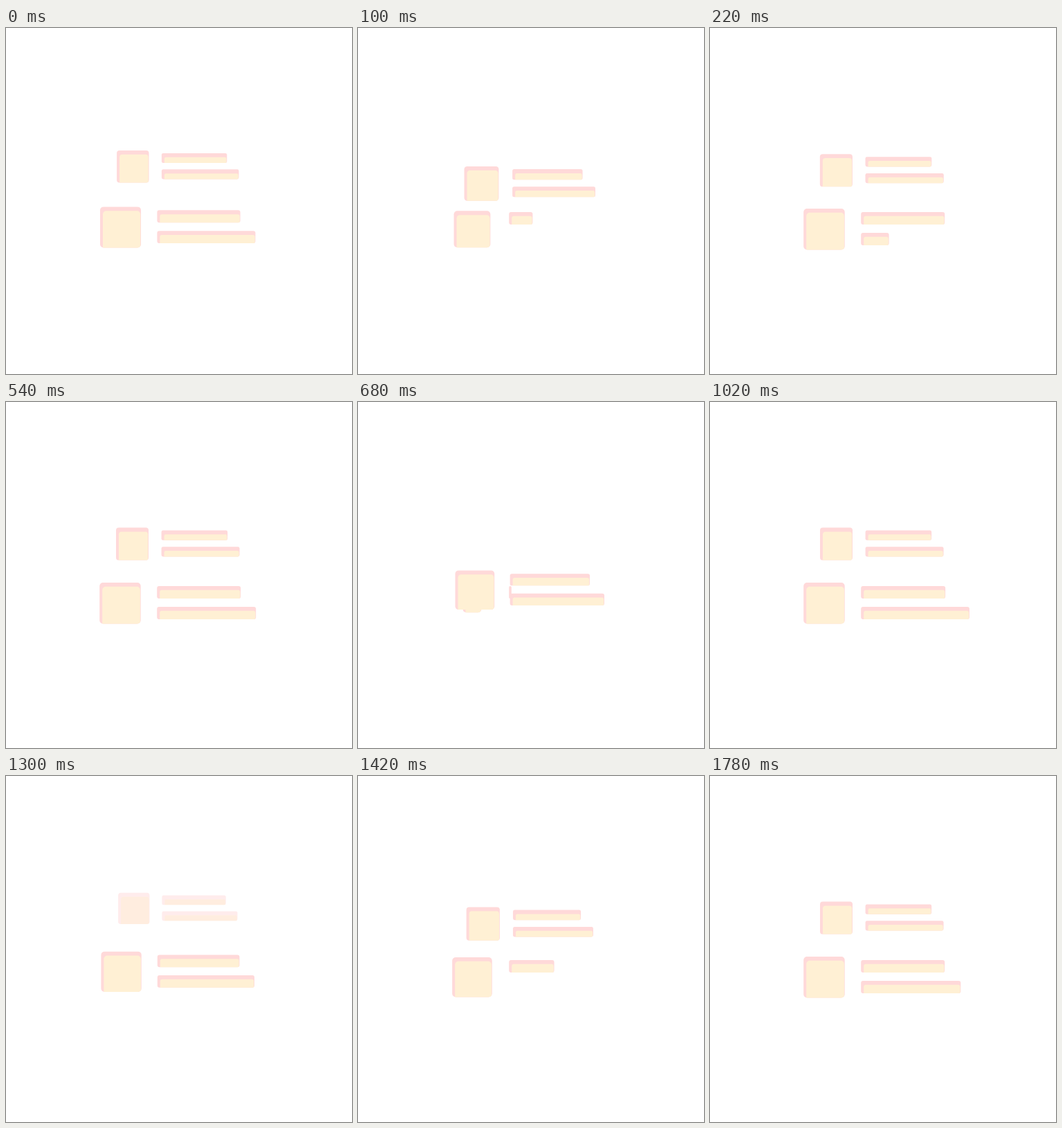
Recreate the animation shown at these times as an HTML page with a canvas. Size 500 by 500 pixels, loop 1.8 s.

```html
<!DOCTYPE html>
<html lang="en">
<head>
<meta charset="utf-8">
<title>List loop</title>
<style>
  html, body { margin: 0; width: 100%; height: 100%; overflow: hidden; background: #fff; }
  canvas { display: block; width: 500px; height: 500px; }
</style>
</head>
<body>
<canvas id="stage" width="500" height="500"></canvas>
<script>
const ctx = document.getElementById('stage').getContext('2d');
const PINK = '#ffd9d9', CREAM = '#fff0d4';
const LOOP = 1800, CYCLE = 640, STEP = 20, LEAD = 40;
const SQUARE = 59.5, BARS = [{ y: 5, w: 121 }, { y: 35, w: 143 }];

// Resting places of a row: front, back and gone
const FRONT = { x: 135.2, y: 261, s: 1 };
const BACK = { x: 159, y: 181.6, s: 0.79 };
const GONE = { x: 192, y: 42, s: 0.5 };

const clamp = v => Math.min(1, Math.max(0, v));
const lerp = (a, b, p) => a + (b - a) * p;
const between = (a, b, p) => ({ x: lerp(a.x, b.x, p), y: lerp(a.y, b.y, p), s: lerp(a.s, b.s, p) });
const sine = p => (1 - Math.cos(Math.PI * p)) / 2;

// cubic-bezier(.5, 0, .09, 1)
function glide(x) {
  if (x <= 0 || x >= 1) return clamp(x);
  let lo = 0, hi = 1;
  for (let i = 0; i < 24; i++) {
    const s = (lo + hi) / 2, r = 1 - s;
    if (1.5 * r * r * s + 0.27 * r * s * s + s * s * s < x) lo = s; else hi = s;
  }
  return lo * lo * (3 - 2 * lo);
}

// Bar growth: rises past full length, then settles
function stretch(t) {
  if (t < 257) return 1.1 * sine(clamp(t / 257));
  return 1 + 0.1 * Math.pow(1 - sine(clamp((t - 257) / 150)), 1.4);
}

function block(x, y, w, h, r) {
  if (w < 0.5 || h < 0.5) return;
  r = Math.min(r, w / 2, h / 2);
  ctx.save();
  ctx.beginPath();
  ctx.roundRect(x, y, w, h, r);
  ctx.fillStyle = PINK;
  ctx.fill();
  if (w > 5) {
    ctx.clip();
    ctx.beginPath();
    ctx.roundRect(x + 4, y + 5.8, w - 4.8, h, r);
    ctx.fillStyle = CREAM;
    ctx.fill();
  }
  ctx.restore();
}

function row({ x, y, s }, pop = 1, grow = [1, 1], alpha = 1) {
  ctx.globalAlpha = alpha;
  const size = SQUARE * s * pop, gap = (SQUARE * s - size) / 2;
  block(x + gap, y + gap, size, size, 5 * s);
  BARS.forEach((bar, i) =>
    block(x + 83 * s, y + bar.y * s, bar.w * s * grow[i], 18 * s, 3 * s));
  ctx.globalAlpha = 1;
}

function draw(t) {
  const w = (t + LEAD) % CYCLE;
  const p = glide(w / 300);
  const fade = 1 - clamp((w - 40) / 40);
  ctx.fillStyle = '#fff';
  ctx.fillRect(0, 0, 500, 500);
  row(FRONT, glide(w / 240), [stretch(w - 53), stretch(w - 173)]);
  if (fade > 0) row(between(BACK, GONE, p), 1, [1, 1], fade);
  row(between(FRONT, BACK, p));
}

const start = performance.now();
function tick() {
  const t = (performance.now() - start) % LOOP;
  draw(Math.floor(t / STEP) * STEP);
  requestAnimationFrame(tick);
}
tick();
</script>
</body>
</html>
```
